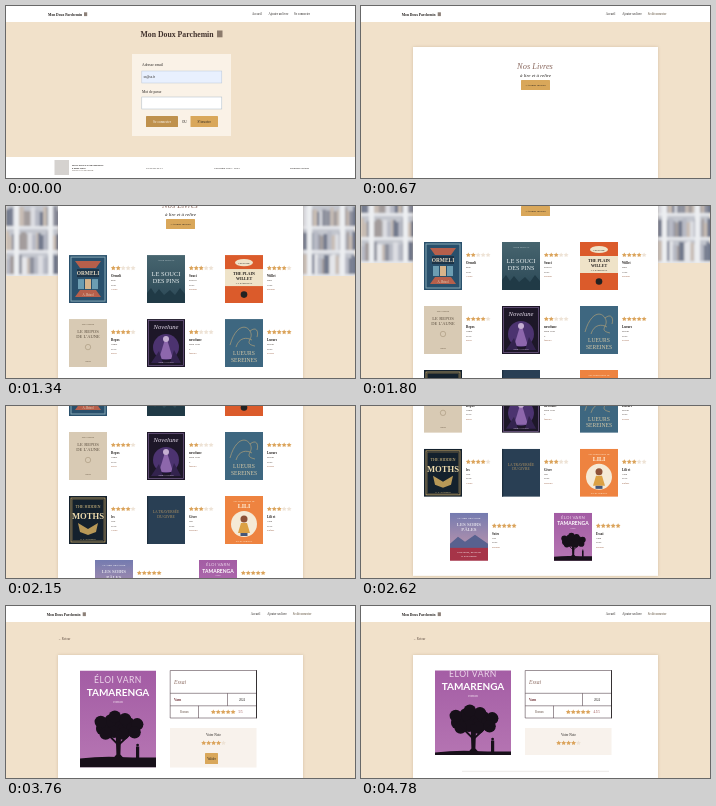
An HTML page that plays this animation: 349 by 172 pixels, repeating every 5510 ms.

```html
<!DOCTYPE html>
<html lang="fr">
<head>
<meta charset="utf-8">
<title>Librairie</title>
<style>
html, body { margin: 0; width: 100%; height: 100%; overflow: hidden; background: #f1e1ca; }
svg { display: block; width: 100vw; height: 100vh; }
text { font-family: "Liberation Serif", "Noto Serif", serif; }
text.sans { font-family: Lato, "Open Sans", sans-serif; }
.shade { filter: drop-shadow(0 0 1.6px rgba(90, 60, 20, .2)); }
</style>
</head>
<body>
<svg id="stage" viewBox="0 0 349 172" xmlns="http://www.w3.org/2000/svg"></svg>
<script>
const LOOP = 5510, TICK = 68.3, STEP = 74;
const SAND = '#f1e1ca', GOLD = '#d9a75a', INK = '#24201e', ROSE = '#8b6a60';
const stage = document.getElementById('stage');

// Markup helpers
const rect = (x, y, w, h, fill, more = '') =>
  `<rect x="${x}" y="${y}" width="${w}" height="${h}" fill="${fill}" ${more}/>`;
const circle = (x, y, r, fill, more = '') =>
  `<circle cx="${x}" cy="${y}" r="${r}" fill="${fill}" ${more}/>`;
const path = (d, fill, more = '') => `<path d="${d}" fill="${fill}" ${more}/>`;
const line = (d, color, w) => path(d, 'none', `stroke="${color}" stroke-width="${w}"`);
const text = (x, y, size, s, fill = INK, more = '') =>
  `<text x="${x}" y="${y}" font-size="${size}" fill="${fill}" ${more}>${s}</text>`;
const MID = 'text-anchor="middle"', BOLD = 'font-weight="700"', ITAL = 'font-style="italic"';
const mid = (x, y, size, s, fill, more = '') => text(x, y, size, s, fill, MID + ' ' + more);
const group = (id, body, more = '') => `<g id="${id}" ${more}>${body}</g>`;
const at = (x, y, body, scale = 1) =>
  `<g transform="translate(${x} ${y}) scale(${scale})">${body}</g>`;

function star(x, y, r, fill) {
  let d = '';
  for (let i = 0; i < 10; i++) {
    const a = i * Math.PI / 5 - Math.PI / 2, k = i % 2 ? r * .5 : r;
    d += (i ? 'L' : 'M') + (x + k * Math.cos(a)).toFixed(2) + ' ' + (y + k * Math.sin(a)).toFixed(2);
  }
  return path(d + 'Z', fill);
}

const stars = (x, y, n) =>
  [0, 1, 2, 3, 4].map(i => star(x + i * 4.95, y, 2.6, i < n ? '#dba45c' : '#eee3d6')).join('');

function header(dx, last) {
  return rect(0, 0, 349, 16, '#fff') +
    text(42 + dx, 10, 3.6, 'Mon Doux Parchemin', INK, BOLD) +
    rect(78 + dx, 6.3, 3.2, 3.8, '#8c8078') +
    text(246 + dx, 9, 3.1, 'Accueil') +
    text(262.5 + dx, 9, 3.1, 'Ajouter un livre') +
    text(288 + dx, 9, 3.1, last, last === 'Se connecter' ? INK : '#55452f');
}

function footer(y) {
  return at(0, y, rect(0, 0, 349, 21, '#fff') + rect(48.5, 3, 14.5, 15, '#d5d2cf') +
    text(66, 8.6, 2.6, 'MON DOUX PARCHEMIN', INK, BOLD) +
    text(66, 11.5, 2.6, '8 allée Verte', INK, BOLD) +
    text(66, 14.4, 2.6, '00000 VALMORNE', '#5b5148') +
    text(140, 11.6, 2.8, '01 99 00 42 17') +
    text(208, 11.6, 2.8, 'Copyright 2022 - 2023') +
    text(284, 11.6, 2.8, 'Mentions légales'));
}

// Blurred bookshelves behind the list
function shelves() {
  let seed = 11, out = rect(0, 16, 349, 115, '#c3c6ce');
  const rnd = () => (seed = seed * 16807 % 2147483647) / 2147483647;
  const tones = ['#8d909d', '#b7bac5', '#dcdde2', '#a39c9c', '#70778a', '#c9bdb4', '#e6e7ea'];
  for (let y = 12; y < 131; y += 24) {
    for (let x = 0; x < 349;) {
      const w = 1.5 + rnd() * 4, h = 14 + rnd() * 6;
      out += rect(x.toFixed(1), (y + 21 - h).toFixed(1), w.toFixed(1), h.toFixed(1),
        tones[Math.floor(rnd() * tones.length)]);
      x += w;
      if (x > 52 && x < 297 && y > 36) x = 297;
    }
    out += rect(0, y + 21, 349, 3, '#e4e6ea');
  }
  for (const x of [8, 42, 78, 148, 182, 236, 301, 334]) out += rect(x, 16, 5, 115, '#eceef1');
  return `<g clip-path="url(#photo)"><g filter="url(#soft)">${out}</g></g>`;
}

// Covers, each 38 by 48
const frame = (c, w = .6, m = 2) => rect(m, m, 38 - 2 * m, 48 - 2 * m, 'none', `stroke="${c}" stroke-width="${w}"`);
const covers = [
  () => rect(0, 0, 38, 48, '#29506c') + frame('#86a7b4', 1) +
    path('M6 6H32L27 13H11ZM6 42H32L27 35H11Z', '#b65f4b') +
    rect(8, 14, 22, 8, '#1d3448') + mid(19, 20, 5.4, 'ORMELI', '#e8dcc4', BOLD) +
    rect(9, 24, 6, 10, '#6c9db2') + rect(16, 24, 6, 10, '#d8b48a') + rect(23, 24, 6, 10, '#6c9db2') +
    mid(19, 41, 3, 'A. Brisol', '#e8dcc4'),
  () => rect(0, 0, 38, 48, 'url(#mist)') + mid(19, 5.5, 2.4, 'ANNE DORVAL', '#b9c8cd') +
    mid(19, 20.5, 6.5, 'LE SOUCI', '#e6edee') + mid(19, 28, 6.2, 'DES PINS', '#e6edee') +
    path('M0 48V38L4 33L8 39L12 34L17 40L23 35L28 40L33 33L38 39V48Z', '#203a46'),
  () => rect(0, 0, 38, 48, '#db5b2b') + rect(0, 14, 38, 17, '#efe3c8') +
    `<ellipse cx="19" cy="7.5" rx="9" ry="3.6" fill="#efe3c8"/>` + mid(19, 8.5, 2.5, 'LECTURE', INK) +
    mid(19, 20, 4, 'THE PLAIN', INK, BOLD) + mid(19, 24.8, 4, 'WILLET', INK, BOLD) +
    mid(19, 29, 2.2, 'J. T. HARROWAY', INK) + circle(19, 39.5, 3.3, '#222'),
  () => rect(0, 0, 38, 48, '#d8cab4') + mid(19, 6, 2.3, 'Paul Ormesin', '#746551') +
    mid(19, 14, 4.7, 'LE REPOS', '#5d5041') + mid(19, 19, 4.5, 'DE L’AUNE', '#5d5041') +
    circle(19, 28, 2.7, 'none', 'stroke="#a6957b" stroke-width=".6"') + mid(19, 43, 2.2, 'roman', '#746551'),
  () => rect(0, 0, 38, 48, '#1d1728') + frame('#78618f', .7, 1.5) +
    circle(19, 28, 13, '#4c3370') + path('M19 17L26 40H12Z', '#8d67ac') + circle(19, 20, 3, '#c5afd2') +
    path('M4 44L12 32L16 44ZM34 44L27 31L23 44Z', '#33234e') +
    mid(19, 10, 6.6, 'Novelune', '#e6dcec', ITAL) + mid(19, 44, 2.8, 'MIRA SOLD', '#d9c9e2'),
  () => rect(0, 0, 38, 48, '#3e6780') +
    line('M5 26C10 8 20 4 25 12S17 24 30 27M11 28C14 18 22 18 27 21M25 12C31 7 34 12 32 18', '#c2a877', .6) +
    mid(19, 36, 5.6, 'LUEURS', '#d5c8a6') + mid(19, 42.5, 5.6, 'SEREINES', '#d5c8a6'),
  () => rect(0, 0, 38, 48, '#14212d') + frame('#c5a565', .8) + frame('#806d46', .4, 3.5) +
    mid(19, 12, 4.2, 'THE HIDDEN', '#dec383') + mid(19, 23, 8.6, 'MOTHS', '#efdcad', BOLD) +
    path('M19 33L9 27L11 36L19 39L27 36L29 27Z', '#b79857') + mid(19, 44, 2.4, 'T. L. WARDEN', '#dec383'),
  () => rect(0, 0, 38, 48, '#293f54') + mid(19, 17, 3.7, 'LA TRAVERSÉE', '#b39563') +
    mid(19, 21.5, 3.7, 'DU GIVRE', '#b39563') + line('M0.6 0V48', '#1d2e3e', 1.2),
  () => rect(0, 0, 38, 48, '#ee8340') + mid(19, 6, 2.8, 'Les beaux jours de', '#fff0d9', ITAL) +
    mid(19, 12, 6, 'LILI', '#fff0d9', BOLD) + circle(19, 28, 13, '#f5ead6') +
    circle(19, 23, 3.5, '#8d5137') + path('M16 27H22L25 37H13Z', '#dca143') +
    rect(15.5, 37, 7, 3, '#465778') + mid(19, 45.5, 2.4, 'JULIE VERNOL', '#fff0d9'),
  () => rect(0, 0, 38, 48, 'url(#dusk)') + mid(19, 6, 2.7, 'CLAIRE ORVANNE', '#fff') +
    mid(19, 13, 5, 'LES SOIRS', '#fff') + mid(19, 18.5, 5, 'PÂLES', '#fff') +
    path('M0 31L8 24L15 29L25 22L38 31V38H0Z', '#58618f') + rect(0, 35, 38, 13, '#a63448') +
    mid(19, 40, 2.8, 'Une vallée, un secret', '#fff') + mid(19, 44.5, 2.6, 'et trois saisons', '#fff'),
  () => rect(0, 0, 38, 48.5, 'url(#plum)') +
    mid(19, 6, 4.3, 'ÉLOI VARN', '#ecd5ea', 'class="sans" letter-spacing=".25"') +
    mid(19, 12.6, 5, 'TAMARENGA', '#fff', 'class="sans" ' + BOLD) +
    mid(19, 16.2, 1.9, 'roman', '#f0ddee') + tree()
];

function tree() {
  let out = '';
  for (let i = 0; i < 17; i++) {
    const a = i * 2.4, k = Math.sqrt(i / 17);
    out += circle((18.8 + 11.5 * k * Math.cos(a)).toFixed(1), (27.8 + 5 * k * Math.sin(a)).toFixed(1), 3.1, '#171019');
  }
  return out + path('M17.8 30L18.2 42L16.5 44H22L20.2 42L20.6 30Z', '#171019') +
    line('M19 37L12 30M19.5 37L27 30', '#171019', .9) +
    path('M0 44Q10 42.8 19 43.2T38 43.5V48.5H0Z', '#171019') +
    circle(28.8, 37.3, .7, '#171019') + rect(28, 38, 1.6, 6, '#171019');
}

// [left, row, stars, title, author, year, genre]
const books = [
  [63, 0, 2, 'Ormeli', 'Bris', '2021', 'Conte'],
  [141, 0, 3, 'Souci', 'Dorval', '2023', 'Roman'],
  [219, 0, 4, 'Willet', 'Harr', '1925', 'Roman'],
  [63, 1, 4, 'Repos', 'Orme', '2019', 'Récit'],
  [141, 1, 2, 'novelune', 'Mira Sold', '2', 'fantasy'],
  [219, 1, 5, 'Lueurs', 'Tissan', '2020', 'Poésie'],
  [63, 2, 4, 'les', 'War', '2018', 'Conte'],
  [141, 2, 3, 'Givre', 'test', '2022', 'Histoire'],
  [219, 2, 3, 'Lili et', 'Vern', '2015', 'Enfant'],
  [89, 3, 5, 'Soirs', 'Orv', '2024', 'Roman'],
  [193, 3, 5, 'Essai', 'Varn', '2024', 'Roman']
];

function book([x, row, n, title, ...rest], i) {
  const y = 110 + row * 64;
  return at(x, y, `<g clip-path="url(#cover)">${covers[i]()}</g>` + stars(44.3, 13, n) +
    text(42, 21.8, 3.3, title, INK, BOLD) +
    rest.map((s, k) => text(42, 26.2 + k * 4.3, 2.7, s, k === 2 ? '#a2694d' : '#4b403b')).join(''));
}

function login() {
  return rect(0, 0, 349, 172, SAND) + header(0, 'Se connecter') +
    text(134.5, 31, 7.75, 'Mon Doux Parchemin', '#40312c', BOLD) + rect(211, 24.5, 5.5, 6.8, '#8c7b6c') +
    rect(126, 48, 99, 82, '#faf2e7') +
    text(136, 60, 3.7, 'Adresse email') +
    rect(135.8, 65, 80, 12, '#e8f0fe', 'stroke="#b9c6d8" stroke-width=".5"') + text(137.5, 72, 3, 'xx@xx.fr') +
    text(136, 87, 3.7, 'Mot de passe') +
    rect(135.8, 91, 80, 12, '#fff', 'stroke="#a9b9c6" stroke-width=".5"') +
    rect(140, 110, 32, 11, '#bf914d', 'rx=".6"') + mid(156, 116.8, 3.5, 'Se connecter', '#fff') +
    mid(178.3, 116.8, 3.3, 'OU') +
    rect(184.5, 110, 27.5, 11, GOLD, 'rx=".6"') + mid(198.2, 116.8, 3.5, 'S’inscrire') + footer(151);
}

function home() {
  return rect(0, 0, 349, 394, SAND) + group('hero', shelves()) + header(-1.3, 'Se déconnecter') +
    rect(52, 41, 245, 324, '#fff', 'class="shade"') +
    mid(174, 63, 8.4, 'Nos Livres', ROSE, ITAL) +
    mid(174.5, 71, 5, 'à lire et à relire', INK, ITAL) +
    rect(160, 74, 29, 10, GOLD, 'rx=".5"') + mid(174.5, 80, 2.9, '+ Ajouter un livre') +
    group('list', books.map(book).join('')) + footer(373);
}

function loading() {
  return rect(0, 0, 349, 172, SAND) + header(0, 'Se déconnecter') +
    text(53, 60, 3.1, '← Retour', '#5c4b40') + text(53, 82, 8.3, 'Chargement...', ROSE, ITAL) + footer(151);
}

function detail() {
  const art = (id, h, dy) => group(id, `<svg x="74" y="64.5" width="76" height="${h}">` +
    at(0, dy, covers[10](), 2) + '</svg>');
  return rect(0, 0, 349, 172, SAND) + header(-1.3, 'Se déconnecter') +
    text(52, 34, 3.1, '← Retour', '#5c4b40') +
    rect(52, 49, 245, 130, '#fff', 'class="shade"') +
    group('art', art('artTall', 97, 0) + art('artShort', 84.5, -6)) +
    line('M164.2 64.5H250.5M164.2 87.3H250.5M164.2 99.8H250.5M164.2 112H250.5M164.2 64.5V112M221.5 87.3V99.8M192.5 99.8V112', '#4c3942', .55) +
    line('M250.5 64.2V112.3', '#1f1a1c', .9) +
    text(168, 78, 5.6, 'Essai', ROSE, ITAL) +
    text(168, 94.7, 3.4, 'Varn', '#6d2f35', BOLD) + mid(236, 94.7, 3, '2024') +
    mid(178.3, 107, 3, 'Roman', '#6d5a50') + stars(207.3, 106, 5) +
    text(232.5, 107.3, 3.1, '<tspan id="score"></tspan>', '#8f3c3c') +
    `<rect id="panel" x="164" y="122" width="86.5" fill="#f8f2ec"/>` +
    `<text id="ask" x="207.5" y="130.4" font-size="3.5" fill="${INK}" ${MID}></text>` +
    group('blank', stars(197.7, 137, 0)) + group('voted', stars(197.7, 137, 4)) +
    group('send', `<rect id="sendBox" x="199" y="147" width="13" height="11" rx=".5"/>` +
      mid(205.5, 153.6, 3, 'Valider')) +
    group('rule', line('M101 165.3H248', '#d9d4cf', .5));
}

const gradient = (id, a, b) => `<linearGradient id="${id}" x2="0" y2="1"><stop stop-color="${a}"/>` +
  `<stop offset="1" stop-color="${b}"/></linearGradient>`;

stage.innerHTML = '<defs>' + gradient('mist', '#47656f', '#2b4856') + gradient('dusk', '#747bb0', '#d09bab') +
  gradient('plum', '#a35ca4', '#b676b3') +
  '<filter id="soft"><feGaussianBlur stdDeviation=".8"/></filter>' +
  `<clipPath id="photo">${rect(0, 16, 349, 115, '#fff')}</clipPath>` +
  `<clipPath id="cover">${rect(0, 0, 38, 48, '#fff')}</clipPath></defs>` +
  group('login', login()) + group('home', home()) + group('loading', loading()) + group('detail', detail()) +
  group('status', rect(0, 167.7, 48, 4.3, '#34343a') + text(1, 170.9, 2.7, 'localhost:3000/livre/64f1c2a9d7', '#e2e2e2'));

const part = {};
stage.querySelectorAll('[id]').forEach(n => part[n.id] = n);
const show = (id, on) => part[id].style.display = on ? '' : 'none';
const clamp = v => Math.max(0, Math.min(1, v));
const ease = u => 1 - Math.pow(1 - u, 2.5);
const ticks = (t, start, n) => clamp(Math.floor((t - start) / TICK) / n);
const scroll = t => STEP * [[1120, 6], [1800, 5], [2480, 6]]
  .reduce((sum, [start, n]) => sum + ease(ticks(t, start, n)), 0);

function render(t) {
  show('login', t < 670);
  show('home', t >= 670 && t < 3150);
  show('loading', t >= 3150 && t < 3350);
  show('detail', t >= 3350);
  show('status', t >= 2890 && t < 3290);

  show('hero', t >= 740);
  show('list', t >= 810);
  part.home.setAttribute('transform', `translate(0 ${-scroll(t).toFixed(2)})`);

  const voted = t >= 3760, saved = t >= 4780;
  show('art', t >= 3420);
  show('artTall', !saved);
  show('artShort', saved);
  show('blank', !voted);
  show('voted', voted);
  show('send', !saved);
  show('rule', saved);
  part.panel.setAttribute('height', saved ? 27 : 39.5);
  part.ask.textContent = voted ? 'Votre Note' : 'Notez cet ouvrage';
  part.score.textContent = saved ? '4.5/5' : '5/5';

  const k = t < 4030 ? 0 : clamp((Math.floor((t - 4030) / TICK) + 1) / 8);
  const mix = (a, b) => Math.round(a + (b - a) * k);
  part.sendBox.setAttribute('fill', `rgb(${mix(217, 184)},${mix(167, 137)},${mix(90, 68)})`);
}

function tick() {
  render(performance.now() % LOOP);
  requestAnimationFrame(tick);
}
tick();
</script>
</body>
</html>
```
